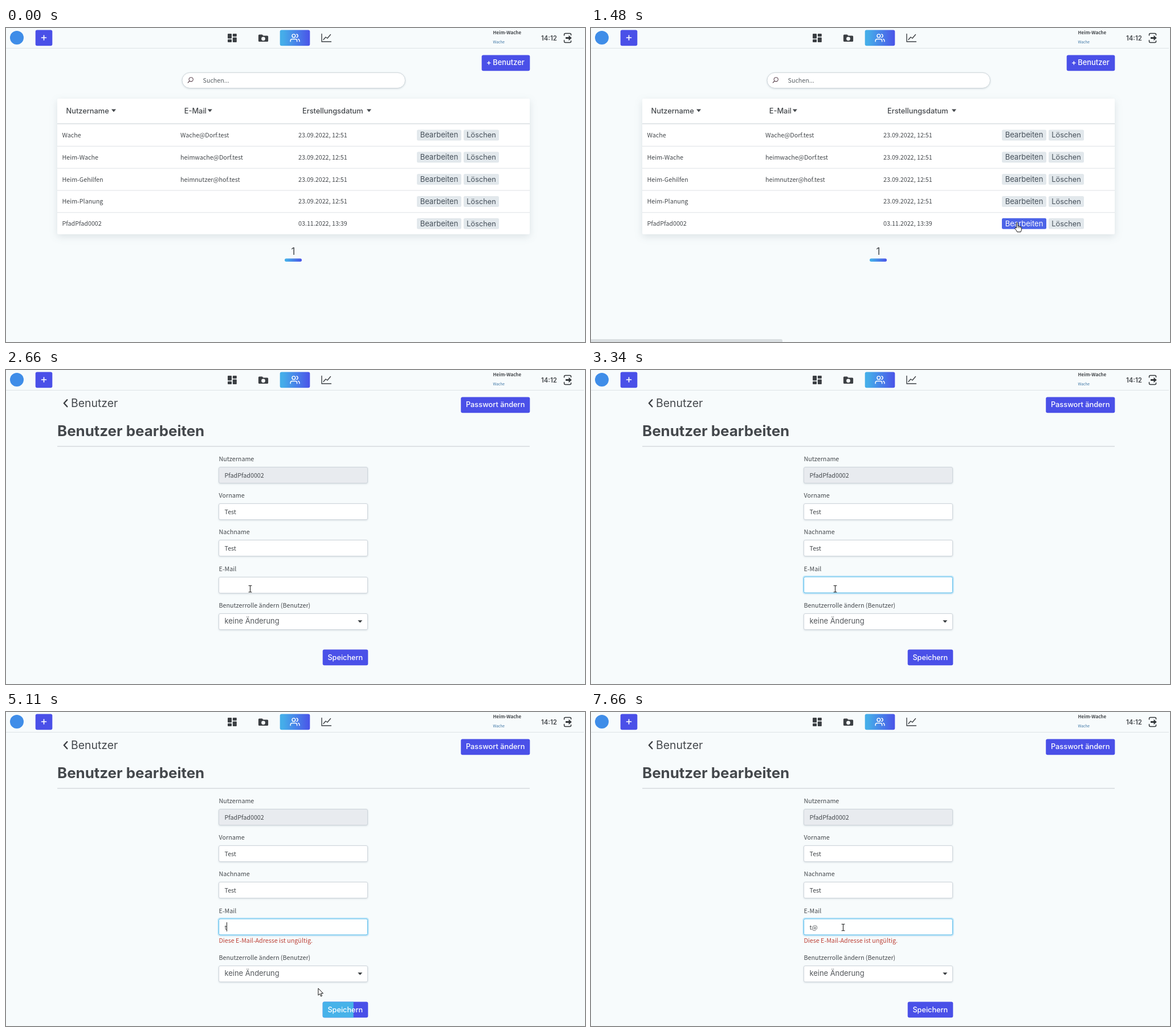
An HTML page for the animation above (8000 ms loop, 1016 by 551 pixels).

```html
<!DOCTYPE html>
<html lang="de">
<head>
<meta charset="utf-8">
<title>Benutzerverwaltung</title>
<style>
html, body { margin: 0; width: 100%; height: 100%; overflow: hidden; background: #f7fbfc; }
svg { display: block; width: 100%; height: 100%; }
.ui { font-family: Inter, "Open Sans", sans-serif; }
.body { font-family: "Noto Sans CJK JP", "Noto Sans CJK SC", "Noto Sans CJK", "Open Sans", sans-serif; }
text { white-space: pre; }
.card { filter: drop-shadow(0 4px 7px rgba(40, 60, 80, .13)); }
.field { filter: drop-shadow(0 1px 1.5px rgba(40, 60, 80, .16)); }
</style>
</head>
<body>
<svg id="stage" viewBox="0 0 1016 551"></svg>
<script>
const LOOP = 8000;
const INK = '#44484c', SOFT = '#54585c', BLUE = '#4a50e8', SKY = '#47b2e9';

const rect = (x, y, w, h, fill, r = 0, more = '') =>
  `<rect x="${x}" y="${y}" width="${w}" height="${h}" rx="${r}" fill="${fill}" ${more}/>`;
const path = (d, more = '') => `<path d="${d}" ${more}/>`;
const text = (cls, x, y, size, str, fill = INK, weight = 400, more = '') =>
  `<text class="${cls}" x="${x}" y="${y}" font-size="${size}" fill="${fill}" font-weight="${weight}" ${more}>${str}</text>`;
const ui = (...a) => text('ui', ...a);
const body = (x, y, str, fill = INK, more = '') => text('body', x, y, 10.72, str, fill, 400, more);
const line = (x1, x2, y, color, w = 1) => rect(x1, y - w / 2, x2 - x1, w, color);
const group = (id, content, more = '') => `<g id="${id}" ${more}>${content}</g>`;
const button = (x, y, w, fill = BLUE) => rect(x - .3, y - .4, w + .6, 27.6, fill, 3);
const middle = 'text-anchor="middle"';
const stroke = (color, w) => `fill="none" stroke="${color}" stroke-width="${w}" stroke-linecap="round" stroke-linejoin="round"`;

function header() {
  return line(0, 1014, 35.5, '#dde2e5')
    + `<circle cx="19" cy="17" r="12" fill="#3f8de8"/>`
    + button(52, 4, 29)
    + path('M62.5 17h8M66.5 13v8', stroke('#fff', 1.7))
    + [[389, 10, 8.5], [389, 20, 5], [397.8, 10, 5], [397.8, 16.5, 8.5]]
        .map(([x, y, h]) => rect(x, y, 7, h, '#3b3f43', 1)).join('')
    + path('M444.5 11.5h5l2 2h7a1.6 1.6 0 0 1 1.6 1.6v7.3a1.6 1.6 0 0 1-1.6 1.6h-14a1.6 1.6 0 0 1-1.6-1.6v-9.3a1.6 1.6 0 0 1 1.6-1.6z', 'fill="#3b3f43"')
    + '<circle cx="451.5" cy="18.8" r="3.4" fill="#f7fbfc"/>'
    + button(481, 4, 52, 'url(#sky)')
    + `<g transform="translate(498.4 8.7) scale(.72)" ${stroke('#fff', 2)}>
        <circle cx="9" cy="7" r="4"/>
        <path d="M17 21v-2a4 4 0 0 0-4-4H5a4 4 0 0 0-4 4v2M23 21v-2a4 4 0 0 0-3-3.9M16 3.1a4 4 0 0 1 0 7.8"/></g>`
    + path('M554 10.5v13.5h16.5M557 20.5l4-4.5 3 2 5.5-6.5', stroke('#3b3f43', 1.4))
    + text('body', 854.5, 10.5, 8, 'Heim-Wache', INK, 700)
    + text('body', 854.5, 27, 6.6, 'Wache', '#3d76a5')
    + ui(939, 21.5, 11.3, '14:12', INK, 600)
    + path('M979.5 13v-1.5a2 2 0 0 1 2-2h8a2 2 0 0 1 2 2v1M979.5 21.5v2a2 2 0 0 0 2 2h8a2 2 0 0 0 2-2v-1', stroke('#33373a', 1.5))
    + path('M982 16h5.5v-3.2l5.2 4.7-5.2 4.7V19H982z', 'fill="#33373a"');
}

function listPage() {
  const rows = [
    ['Wache', 'Wache@Dorf.test'],
    ['Heim-Wache', 'heimwache@Dorf.test'],
    ['Heim-Gehilfen', 'heimnutzer@hof.test'],
    ['Heim-Planung', ''],
    ['PfadPfad0002', '', '03.11.2022, 13:39'],
  ];
  const heads = [[105.5, 'Nutzername', 185], [312.8, 'E-Mail', 353.8], [520, 'Erstellungsdatum', 633]];
  let s = button(835, 48, 84)
    + ui(843, 65.3, 12.9, '+', '#fff', 600)
    + ui(854.3, 65.3, 12.9, 'Benutzer', '#fff', 500)
    + rect(309, 78.3, 391.5, 27.2, '#fff', 13.6, 'class="field" stroke="#ccd4d9"')
    + path('M328.3 90.3a3.6 3.6 0 1 1-7.2 0a3.6 3.6 0 1 1 7.2 0M322 93l-2.8 3', stroke('#5d4550', 1.1))
    + body(345.5, 96.3, 'Suchen...', '#5a6065')
    + rect(90, 124, 829, 238, '#fff', 2, 'class="card"')
    + line(90, 919, 168, '#dbe0e4', 1.6);
  for (const [x, label, arrow] of heads)
    s += ui(x, 149.5, 12.8, label, INK, 500) + path(`M${arrow} 142.5h8l-4 5z`, `fill="${INK}"`);
  rows.forEach(([name, mail, date = '23.09.2022, 12:51'], i) => {
    const y = 188 + i * 38.8, last = i === 4;
    if (!last) s += line(90, 919, y + 19.4, '#dde2e5');
    s += body(98.5, y + 4, name) + body(306, y + 4, mail) + body(513, y + 4, date)
      + rect(721, y - 9.5, 78, 19, '#e2e8ec', 2.5, last ? 'id="edit"' : '')
      + ui(760, y + 4.4, 13, 'Bearbeiten', '#46505a', 400, middle + (last ? ' id="editText"' : ''))
      + rect(803, y - 9.5, 62, 19, '#e2e8ec', 2.5)
      + ui(834, y + 4.4, 12.8, 'Löschen', '#46505a', 400, middle);
  });
  return s + ui(504, 398, 17, '1', INK, 400, middle) + rect(489, 404.5, 30, 5.5, 'url(#sky)', 2.7);
}

function editPage() {
  const box = (y, fill) =>
    rect(373.5, y, 261, 28, fill, 2.5, 'class="field" stroke="#cdd4da"');
  let s = path('M107.3 52.3l-5.5 6 5.5 6', stroke('#3b3f43', 2.4))
    + ui(114, 64.6, 19.4, 'Benutzer')
    + button(798.5, 48, 120.5)
    + ui(858.7, 65.3, 12.8, 'Passwort ändern', '#fff', 500, middle)
    + ui(90, 116, 25.9, 'Benutzer bearbeiten', INK, 700)
    + line(90, 919, 134, '#c6cacd');
  [['Nutzername', 'PfadPfad0002'], ['Vorname', 'Test'], ['Nachname', 'Test'], ['E-Mail', '']]
    .forEach(([label, value], i) => {
      const y = Math.floor(170.5 + i * 64.2) + .5;
      s += body(373.5, y - 10.5, label) + box(y, i ? '#fff' : '#e8ebef') + body(383.5, y + 18.4, value);
    });
  s += group('glow',
      rect(372.2, 361.7, 263.6, 30.6, 'none', 3.5, 'stroke="#c2e7f9" stroke-width="2"')
      + rect(373.5, 363, 261, 28, '#fff', 2.5, 'stroke="#52b9ea"'))
    + body(383.5, 381.5, '', INK, 'id="mail"')
    + rect(387, 369, 1, 16, '#222', 0, 'id="caret"')
    + body(373.5, 405, 'Diese E-Mail-Adresse ist ungültig.', '#bd4238', 'id="error"');
  return s + group('lower',
    body(373.5, 416.7, 'Benutzerrolle ändern (Benutzer)')
    + box(427.5, '#fff')
    + ui(383.5, 445.4, 12.9, 'keine Änderung', SOFT)
    + path('M617.3 439.3h8l-4 4.2z', 'fill="#33373a"')
    + button(556, 491, 79)
    + `<g clip-path="url(#saveClip)">${rect(555, 490, 0, 29, SKY, 0, 'id="wipe"')}</g>`
    + ui(595.3, 508.6, 12.7, 'Speichern', '#fff', 500, middle));
}

function cursors() {
  const look = 'fill="#fff" stroke="#111" stroke-width="1" stroke-linejoin="round"';
  return group('cursor',
    path('M0 0v12.2l2.8-2.6 1.9 4.4 1.9-.8-1.9-4.3h3.9z', `id="arrow" ${look}`)
    + group('hand', path('M-1.3 9.5V1.3a1.3 1.3 0 0 1 2.6 0V6l1-.3q1 0 1.2.9l1-.2q1 0 1.2.9 2-.3 2 1.5v3.1q0 1.6-1.4 4.4H.2Q-1.2 13.6-3.6 10.6q-.6-1.2.4-1.7 1-.3 1.9.6z', look)
      + path('M1.3 6v3.3M3.5 6.8v2.5M5.7 7.5v2', stroke('#111', .7)), 'transform="translate(.7 .6)"')
    + path('M-2.5-5.8h1.6l.9.7.9-.7h1.6M-2.5 5.8h1.6l.9-.7.9.7h1.6M0-5V5', `id="beam" ${stroke('#222', 1.1)}`));
}

document.getElementById('stage').innerHTML = `
  <defs>
    <linearGradient id="sky"><stop offset=".1" stop-color="#45ade9"/><stop offset="1" stop-color="#4a54e8"/></linearGradient>
    <clipPath id="saveClip">${button(556, 491, 79)}</clipPath>
  </defs>`
  + rect(0, 0, 1016, 551, '#f7fbfc') + header()
  + group('list', listPage()) + group('form', editPage())
  + path('M0 546h333a3 3 0 0 1 3 3v2H0z', 'id="status" fill="#d9dee1"') + cursors();

const el = {};
document.querySelectorAll('[id]').forEach(n => el[n.id] = n);
const set = (id, key, value) => el[id].setAttribute(key, value);
const show = (id, on) => set(id, 'opacity', +on);
const ramp = (t, a, b) => Math.min(1, Math.max(0, (t - a) / (b - a)));

const track = [
  [140, 928, 523], [300, 900, 480], [500, 850, 405], [700, 808, 362], [870, 786, 340],
  [950, 786, 340], [1100, 734, 339], [1200, 747, 341], [1740, 747, 341], [1880, 565, 334],
  [2040, 497, 322], [2300, 450, 394], [2530, 437, 389], [2660, 428.5, 384], [3740, 428.5, 384],
  [4250, 584, 494], [4410, 603, 502], [4490, 604, 509], [4800, 604, 509], [5110, 548, 485],
  [5250, 535, 472], [5600, 460, 392], [6000, 437, 376], [6130, 437, 376], [6260, 442.5, 378],
];

function pointer(t) {
  const i = track.findIndex(p => p[0] > t);
  if (i < 0) return track[track.length - 1].slice(1);
  if (i === 0) return track[0].slice(1);
  const a = track[i - 1], b = track[i], k = ramp(t, a[0], b[0]);
  return [a[1] + (b[1] - a[1]) * k, a[2] + (b[2] - a[2]) * k];
}

function pointerKind(t, x, y, shift) {
  const over = (x1, y1, x2, y2) => x >= x1 && x <= x2 && y >= y1 && y <= y2;
  if (t < 1740) return over(721, 333, 799, 353) ? 'hand' : 'arrow';
  if (over(556, 491 + shift, 635, 518 + shift)) return 'hand';
  return over(374, 299, 635, 327) || over(374, 363, 635, 391) ? 'beam' : 'arrow';
}

// The caret blinks every 530 ms, counted anew from each focus or key press.
function caretOn(t) {
  if (t < 2810 || (t >= 4650 && t < 4940)) return false;
  const start = [7130, 4940, 3670, 2810].find(s => t >= s);
  return Math.floor((t - start) / 530) % 2 === 0;
}

function draw(t) {
  const swap = ramp(t, 1500, 1600), failed = t >= 4940, shift = failed ? 18 : 0;
  show('list', 1 - swap);
  show('form', swap);
  show('status', ramp(t, 900, 1000) * (1 - ramp(t, 1750, 2010)));

  const hover = ramp(t, 770, 870), mix = (a, b) => Math.round(a + (b - a) * hover);
  set('edit', 'fill', `rgb(${mix(226, 76)},${mix(232, 100)},${mix(236, 232)})`);
  set('editText', 'fill', `rgb(${mix(70, 255)},${mix(80, 255)},${mix(90, 255)})`);

  show('glow', ramp(t, 2800, 2940) - ramp(t, 4650, 4790) + ramp(t, 4940, 5080));
  el.mail.textContent = t < 3670 ? '' : t < 7130 ? 't' : 't@';
  set('caret', 'x', t < 3670 ? 383 : t < 7130 ? 387 : 397);
  show('caret', caretOn(t));
  show('error', failed);
  set('lower', 'transform', `translate(0 ${shift})`);
  set('wipe', 'width', 80 * (ramp(t, 4247, 4567) - ramp(t, 5010, 5330)));

  const [x, y] = pointer(t), kind = pointerKind(t, x, y, shift);
  show('cursor', t >= 140);
  set('cursor', 'transform', `translate(${x} ${y})`);
  for (const id of ['arrow', 'hand', 'beam']) show(id, id === kind);
}

const begin = performance.now();
function tick() {
  draw((performance.now() - begin) % LOOP);
  requestAnimationFrame(tick);
}
tick();
</script>
</body>
</html>
```
